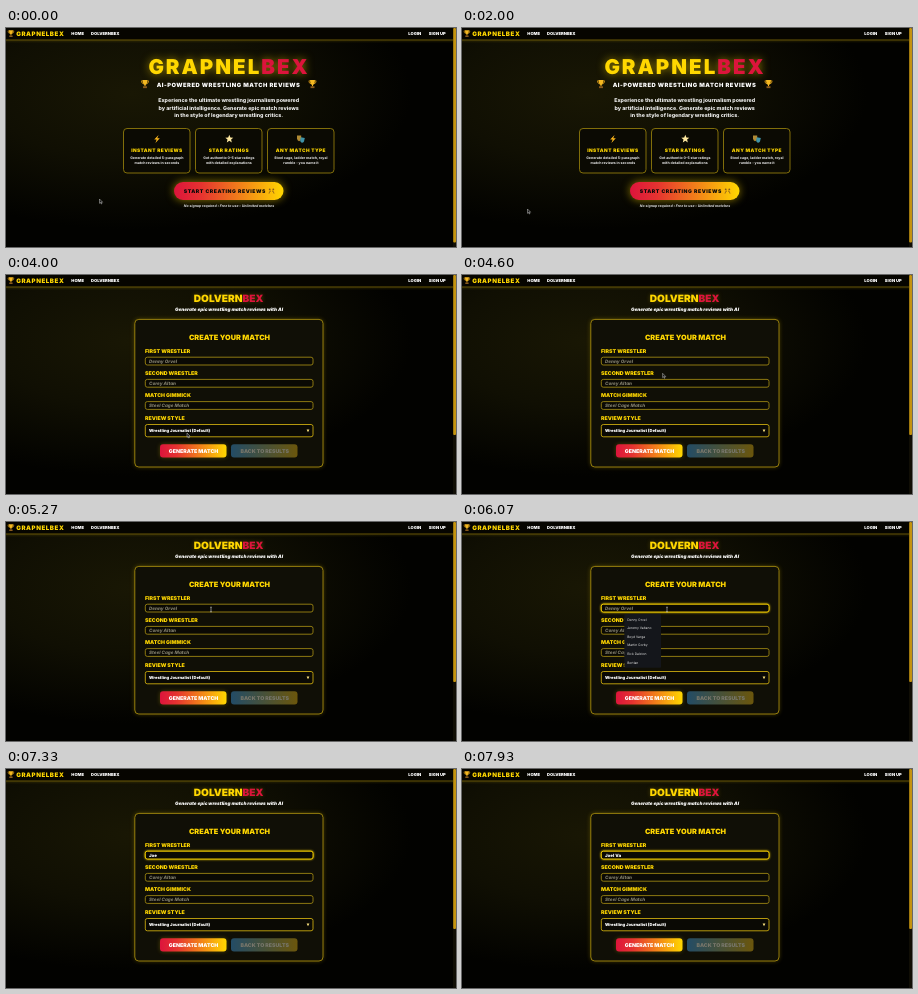
These frames come from a looping animation (450x219 px, 8 s). An HTML page:

```html
<!DOCTYPE html>
<html lang="en">
<head>
<meta charset="utf-8">
<title>Match reviews</title>
<style>
html, body { margin: 0; width: 100%; height: 100%; overflow: hidden; background: #020200; }
svg { display: block; width: 100vw; height: 100vh; }
text { font-family: Inter, "Open Sans", Roboto, sans-serif; font-weight: 900; fill: #fff; text-rendering: geometricPrecision; white-space: pre; }
.mid { text-anchor: middle; }
.gold { fill: #ffd700; }
.red { fill: #dc143c; }
.logo { font-size: 6.2px; letter-spacing: .55px; }
.nav { font-size: 4.15px; }
.hero { font-size: 20.5px; letter-spacing: 2px; }
.tag { font-size: 5.8px; letter-spacing: .5px; }
.lead { font-size: 5.3px; font-weight: 800; fill: #f0f0f0; }
.head { font-size: 4.8px; letter-spacing: .4px; }
.note { font-size: 3.5px; font-weight: 800; fill: #d8d8d8; }
.cta { font-size: 5.1px; letter-spacing: .55px; fill: #0a0a0a; }
.foot { font-size: 3.5px; font-weight: 800; font-style: italic; fill: #ccc; }
.title { font-size: 10.1px; }
.sub { font-size: 4.65px; font-style: italic; }
.form { font-size: 7.3px; }
.label { font-size: 5.25px; }
.hint { font-size: 4.6px; font-weight: 800; font-style: italic; fill: #85826f; }
.value { font-size: 4.4px; }
.pick { font-size: 4.1px; }
.btn { font-size: 5.25px; }
.item { font-size: 3.3px; font-weight: 400; fill: #e4e4e4; }
.panel { fill: #0b0a03; stroke: #8f7a0c; stroke-width: .9; }
.field { fill: #0a0904; stroke: #9b8512; stroke-width: .9; }
.focus { stroke: #ffd700; filter: drop-shadow(0 0 1px #ffd700); }
.glow { filter: drop-shadow(0 0 4px rgba(255, 215, 0, .55)); }
.soft { filter: drop-shadow(0 0 2px rgba(255, 215, 0, .25)); }
</style>
</head>
<body>
<svg viewBox="0 0 450 219" preserveAspectRatio="none">
  <defs>
    <radialGradient id="haze" cx=".28" cy=".3" r=".62">
      <stop offset="0" stop-color="#191704"/>
      <stop offset=".5" stop-color="#100f03"/>
      <stop offset="1" stop-color="#020200"/>
    </radialGradient>
    <linearGradient id="fire">
      <stop offset="0" stop-color="#dc143c"/>
      <stop offset=".25" stop-color="#e63330"/>
      <stop offset="1" stop-color="#ffd700"/>
    </linearGradient>
    <linearGradient id="dim">
      <stop offset="0" stop-color="#234c66"/>
      <stop offset="1" stop-color="#6b560c"/>
    </linearGradient>
    <symbol id="cup" viewBox="0 0 10 10">
      <path d="M2.5 1.5H1Q1 4.5 3.4 4.8M7.5 1.5H9Q9 4.5 6.6 4.8" fill="none" stroke="#d99a16" stroke-width=".9"/>
      <path d="M2.3.5H7.7Q7.7 5.2 5.6 6V7.6H4.4V6Q2.3 5.2 2.3.5Z" fill="#f5b821"/>
      <path d="M2.8 7.6H7.2V9.6H2.8Z" fill="#8a5a1c"/>
    </symbol>
  </defs>

  <rect width="450" height="219" fill="url(#haze)"/>

  <g id="home">
    <text class="hero mid gold glow" x="223" y="45.6">GRAPNEL<tspan class="red">BEX</tspan></text>
    <use href="#cup" x="134.5" y="51.5" width="9" height="9"/>
    <use href="#cup" x="302" y="51.5" width="9" height="9"/>
    <text class="tag mid" x="222.5" y="58.6">AI-POWERED WRESTLING MATCH REVIEWS</text>
    <text class="lead mid" x="222.7" y="74.2">Experience the ultimate wrestling journalism powered</text>
    <text class="lead mid" x="222.7" y="81.7">by artificial intelligence. Generate epic match reviews</text>
    <text class="lead mid" x="222.7" y="89.2">in the style of legendary wrestling critics.</text>

    <g id="cards"></g>
    <path d="M152.6 107 148.2 111.6H150.7L149.4 115 153.8 110.2H151.2Z" fill="#ffb81c"/>
    <path d="M223.3 106.8 224.4 109.5 227.3 109.7 225.1 111.5 225.8 114.4 223.3 112.8 220.8 114.4 221.5 111.5 219.3 109.7 222.2 109.5Z" fill="#ffe9a0"/>
    <path d="M291 107.5H295.2V110.8Q294.6 113 293 113.2 291.3 112.6 291 110.8Z" fill="#b08a34"/>
    <path d="M294.8 109.2 298.8 110 298 113.4Q296.8 115.2 295.4 114.6 294 113.6 294.2 112Z" fill="#3f93a8"/>

    <rect class="glow" x="168" y="154" width="109.5" height="18" rx="9" fill="url(#fire)"/>
    <text class="cta" x="177.8" y="165">START CREATING REVIEWS</text>
    <path d="M263 165.6 263.7 163.5 265 163M268 165.6 267.3 163.5 266 163" fill="none" stroke="#8a5a1c" stroke-width=".8"/>
    <circle cx="263.7" cy="161.4" r=".9" fill="#8a5a1c"/>
    <circle cx="267.3" cy="161.4" r=".9" fill="#8a5a1c"/>
    <text class="foot mid" x="223" y="179.4">No signup required • Free to use • Unlimited matches</text>
  </g>

  <g id="maker">
    <text class="title mid gold soft" x="222.6" y="27.4">DOLVERN<tspan class="red">BEX</tspan></text>
    <text class="sub mid" x="223" y="35.6">Generate epic wrestling match reviews with AI</text>
    <rect class="panel soft" x="128.8" y="44.4" width="188.2" height="147.6" rx="4" style="fill:#100f06;stroke:#a3890e"/>
    <text class="form mid gold" x="223.5" y="65.4">CREATE YOUR MATCH</text>
    <g id="fields"></g>
    <text class="label gold" x="139" y="144.8">REVIEW STYLE</text>
    <rect class="field" x="139.3" y="149.5" width="167.7" height="12.3" rx="2" style="stroke:#c9a90f"/>
    <text class="pick" x="143" y="157">Wrestling Journalist (Default)</text>
    <path d="M300.6 154.6H303.4L302 157.2Z" fill="#ffe680"/>
    <rect class="soft" x="154" y="169.3" width="66.5" height="13.3" rx="3" fill="url(#fire)"/>
    <text class="btn mid" x="187.5" y="177.9">GENERATE MATCH</text>
    <rect x="225" y="169.3" width="66.5" height="13.3" rx="3" fill="url(#dim)"/>
    <text class="btn mid" x="258.7" y="177.9" style="fill:#77766a">BACK TO RESULTS</text>
    <text class="value" id="typed" x="143" y="87.7"></text>
    <g id="menu"></g>
  </g>

  <rect width="450" height="12" fill="#060500"/>
  <rect y="11.6" width="450" height=".8" fill="#806b08"/>
  <rect y="12.4" width="450" height="2" fill="#ffd700" opacity=".06"/>
  <use href="#cup" x="1.2" y="1.8" width="7.5" height="7.5"/>
  <text class="logo gold" x="10.2" y="8">GRAPNELBEX</text>
  <text class="nav" x="65.3" y="7.2">HOME</text>
  <text class="nav" x="85" y="7.2">DOLVERNBEX</text>
  <text class="nav" x="402.3" y="7.2">LOGIN</text>
  <text class="nav" x="422.8" y="7.2">SIGN UP</text>
  <rect x="447" width="3" height="219" fill="#100e05"/>
  <rect id="thumb" x="447.2" width="2.8" rx="1" fill="#c4940f"/>
  <g id="cursor">
    <path id="arrow" d="M0 0V4.3L1 3.4 1.7 5 2.4 4.7 1.7 3.2H3.1Z" fill="#111" stroke="#ddd" stroke-width=".45"/>
    <path id="beam" d="M-.9 0Q0 0 0 .8 0 0 .9 0M0 .8V4.2M-.9 5Q0 5 0 4.2 0 5 .9 5" fill="none" stroke="#ccc" stroke-width=".6"/>
  </g>
</svg>

<script>
const LOOP = 8000, SWITCH = 4000, FOCUS = 5730, TYPE = 6670;
const $ = id => document.getElementById(id);
const show = (el, on) => el.setAttribute('visibility', on ? 'inherit' : 'hidden');

const cards = [
  ['INSTANT REVIEWS', 'Generate detailed 5-paragraph', 'match reviews in seconds'],
  ['STAR RATINGS', 'Get authentic 0-5 star ratings', 'with detailed explanations'],
  ['ANY MATCH TYPE', 'Steel cage, ladder match, royal', 'rumble - you name it']
];
$('cards').innerHTML = cards.map(([head, a, b], i) => {
  const x = 117.5 + i * 72, mid = x + 33.4;
  return `<rect class="panel" x="${x}" y="100.5" width="66.5" height="44.5" rx="3.5"/>
    <text class="head mid gold" x="${mid}" y="124.2">${head}</text>
    <text class="note mid" x="${mid}" y="130.8">${a}</text>
    <text class="note mid" x="${mid}" y="136">${b}</text>`;
}).join('');

const fields = [
  ['FIRST WRESTLER', 'Denny Orvel'],
  ['SECOND WRESTLER', 'Corey Altan'],
  ['MATCH GIMMICK', 'Steel Cage Match']
];
$('fields').innerHTML = fields.map(([label, hint], i) => {
  const y = 82.2 + i * 22.2;
  return `<text class="label gold" x="139" y="${y - 4.2}">${label}</text>
    <rect class="field" x="139.3" y="${y}" width="167.7" height="7.8" rx="2"/>
    <text class="hint" x="143" y="${y + 5.5}">${hint}</text>`;
}).join('');
const field = document.querySelector('.field'), hint = document.querySelector('.hint');

const names = ['Denny Orvel', 'Jeremy Valtano', 'Boyd Varga', 'Martin Corby', 'Rick Dalston', 'Bortlan'];
const matches = ['Jeremy Valtano', 'Jarl Rovenmarck'];
const none = [];
const entry = 'Joel Va';
const keys = [TYPE, 7130, 7270, 7400, 7530, 7730, 7870];

let listed;
function fillMenu(list) {
  if (list === listed) return;
  listed = list;
  $('menu').innerHTML = list.length ?
    `<rect x="162.3" y="92" width="36.7" height="${list.length * 8.6 + 2.2}" rx="1" fill="#14161b"/>` +
    list.map((name, i) => `<text class="item" x="165.2" y="${98.6 + i * 8.6}">${name}</text>`).join('') : '';
}

function glide(t, t0, t1, from, to) {
  const p = Math.min(1, Math.max(0, (t - t0) / (t1 - t0)));
  const e = p * p * (3 - 2 * p);
  return from.map((v, i) => v + (to[i] - v) * e);
}

function draw(now) {
  const t = now % LOOP, home = t < SWITCH;
  show($('home'), home);
  show($('maker'), !home);
  $('thumb').setAttribute('height', home ? 214.5 : 160);

  const [x, y] = home
    ? glide(t, 70, 470, [93.5, 171], [65.5, 181])
    : glide(t, 4070, 4800, [181, 158], [205, 85]);
  const inField = y < 90;
  $('cursor').setAttribute('transform', `translate(${x} ${y})`);
  show($('cursor'), t < TYPE);
  show($('arrow'), !inField);
  show($('beam'), inField);

  const count = keys.filter(k => t >= k).length;
  $('typed').textContent = entry.slice(0, count);
  show(hint, !count);
  field.classList.toggle('focus', t >= FOCUS);
  fillMenu(t < FOCUS || count > 1 ? none : count ? matches : names);
  requestAnimationFrame(draw);
}
draw(performance.now());
</script>
</body>
</html>
```
